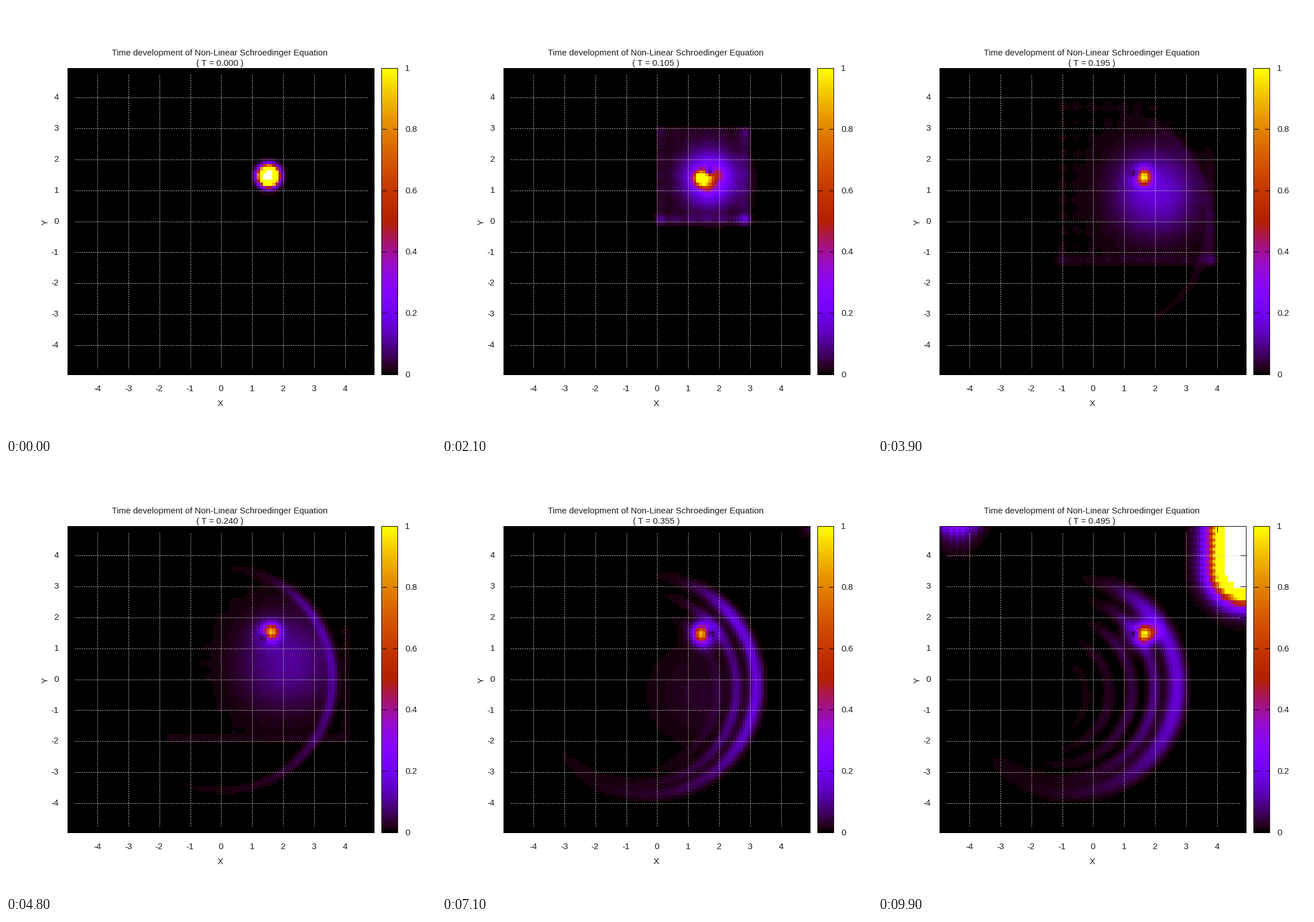
Write a matplotlib script that moves like this. It is 748 by 748 pixels and loops after 10000 ms.

```python
import numpy as np
import matplotlib.pyplot as plt
from matplotlib.animation import FuncAnimation
from matplotlib.colors import ListedColormap

SIZE, DPI, FRAMES = 748, 88, 100
PX = 72 / DPI
LO, HI = 108, 641          # plot square, same in x and y
MID, UNIT = 374.5, 533 / 9.9
END = .495                 # time of the last step
WHITE_ABOVE = 3.35

plt.rcParams["font.family"] = "Liberation Sans"

axis = np.linspace(-4.9, 4.9, 99)
X, Y = np.meshgrid(axis, axis)
RADIUS = np.hypot(X, Y)
PARITY = np.where(np.arange(99) % 2, 1.0, -1.0)


def palette(n):
    g = np.linspace(0, 1, n)
    blue = np.clip(np.sin(2 * np.pi * g), 0, 1)
    return np.column_stack([np.sqrt(g), g ** 3, blue])


def ramp(t, start, length):
    return np.clip((t - start) / length, 0, 1)


def step(v):
    return 1 / (1 + np.exp(-np.clip(v, -50, 50)))


def bell(v, w):
    return np.exp(-(v / w) ** 2)


def blob(x, y, w):
    return bell(np.hypot(X - x, Y - y), w)


def ring(t, n):
    """n-th wave crest reflected by the trap, counted inwards."""
    late = t - .24
    dx = X + 3 * late + .18 * n
    dy = Y + .2 * ramp(t, .24, .1) + .08 * n
    r = 3.6 - .5 * late - n * (.37 + .7 * late)
    w = .15 + .5 * max(late, 0) / (1 + 2 * n)
    phi = np.degrees(np.arctan2(dy, dx))
    turn = (phi + 80 + 180) % 360 - 180
    around = bell(phi + 5 + 4 * n, 50) + .6 * bell(phi - 40, 20) + .12 * bell(turn, 58)
    amp = .16 * .55 ** n * ramp(t, .18 + .06 * n, .12)
    return amp * around * bell(np.hypot(dx, dy) - r, w)


def front(v, lo, hi, low_peak, high_peak):
    ripple = .6 + .12 * np.cos(2 * np.pi * (v - lo - .15) / .5)
    peaks = low_peak * bell(v - lo - .2, .17) + high_peak * bell(v - hi + .2, .17)
    return step((v - lo) / .04) * step((hi - v) / .04) * (ripple + peaks)


def wavefront(t):
    """Square lattice front that runs ahead of the cloud."""
    amp = .11 * np.exp(-10 * t) * ramp(t, 0, .03)
    hi_x = 1.5 + 2.9 * np.sin(min(5.3 * t, np.pi / 2))
    hi_y = 1.5 + 2.6 * np.sin(min(6 * t, np.pi / 2))
    weak = max(.75 - 2.6 * t, 0)
    fx = front(X, 1.25 - 12.5 * t, hi_x, weak, 1.5)
    fy = front(Y, 1.4 - 14.6 * t, hi_y, 1.5, weak)
    return amp * fx * fy * step((4.45 - RADIUS) / .08)


def cloud(t):
    """Dispersed part, swinging clockwise towards the trap centre."""
    amp = .42 * ramp(t, 0, .03) * np.exp(-(t / .2) ** 1.8)
    r = 2.2 - 7 * max(t - .24, 0)
    a = np.radians(45 - 520 * t * t)
    spread = min(.3 + 4.9 * t, 1.45)
    return (amp * blob(r * np.cos(a), r * np.sin(a), spread)
            * step((3.75 - RADIUS) / .08))


def core(t):
    """Bright peak on a small orbit, its glow and the hole opposite it."""
    m = ramp(t, 0, .1)
    a = np.radians(225 + 1270 * (t - .105))
    bx, by = 1.53, 1.47
    ox, oy = m * np.cos(a), m * np.sin(a)
    kx = 17 + 6 * m * np.cos(2 * a)
    ky = 17 + m * (4 - 4 * np.cos(2 * a))
    amp = .7 + 4.4 * np.exp(-t / .055)
    peak = amp * np.exp(-kx * (X - bx - .11 * ox) ** 2 - ky * (Y - by - .11 * oy) ** 2)

    arm = .28 * bell(t - .125, .04) + .3 * ramp(t, .44, .055)
    glow = (.2 * ramp(t, .1, .25) * blob(bx, by, .42)
            + arm * blob(1.9, 1.5, .24)
            + .2 * bell(t - .1, .03) * blob(1.65, 1.12, .24))
    hole = 1 - .85 * m * blob(bx - .22 * ox, by - .22 * oy, .13)
    return peak + glow, hole


def corners(t):
    """Growing noise at the upper edges."""
    left = t - END
    u, v = 4.95 - X, 4.95 - Y
    reach = max(1.35 + 9 * left, 0)
    d = np.hypot(u, np.maximum(v - reach, 0)) - 1 - 12 * left
    right = np.exp(-3.4 * d - 1.3 * d * np.abs(d)) * (1 + .1 * PARITY[:, None])
    top = (.35 * np.exp(36 * left - 3.5 * v) * bell(X + 4.4, .6)
           * (1 + .15 * PARITY[None, :]))
    return right + top


def density(t):
    peak, hole = core(t)
    total = peak + cloud(t) + wavefront(t) + sum(ring(t, n) for n in range(5))
    total = total * hole + corners(t)
    return np.where(total > WHITE_ABOVE, np.nan, total)


fig = plt.figure(figsize=(SIZE / DPI, SIZE / DPI), dpi=DPI, facecolor="white")
ax = fig.add_axes([0, 0, 1, 1])
ax.axis("off")

cmap = ListedColormap(palette(128))
cmap.set_bad("white")


def show(data, x1, x2):
    return ax.imshow(data, cmap=cmap, vmin=0, vmax=1, origin="lower",
                     extent=(x1, x2, HI, LO), aspect="auto",
                     interpolation="nearest", zorder=1)


image = show(density(0), LO, HI)
show(np.linspace(0, 1, 128)[:, None], 654, 681)
ax.set_xlim(0, SIZE)
ax.set_ylim(SIZE, 0)


def line(xs, ys, color="black", **kw):
    ax.plot(xs, ys, color=color, lw=PX, solid_capstyle="butt",
            dash_capstyle="butt", zorder=3, **kw)


def box(x1, x2):
    y1, y2 = LO - .5, HI - .5
    line([x1, x2, x2, x1, x1], [y1, y1, y2, y2, y1])


def label(x, y, s, ha="center", va="baseline", **kw):
    return ax.text(x, y, s, ha=ha, va=va, fontsize=15 * PX, color="#1c1c1c", **kw)


TICK = 11
DOTS = dict(color="#c8c8c8", linestyle=(0, (2, 2)))
for k in range(-4, 5):
    gx, gy = MID + UNIT * k, MID - UNIT * k
    line([gx, gx], [HI - TICK, LO + TICK], **DOTS)
    line([LO + TICK, HI - TICK], [gy, gy], **DOTS)
    for edge in (LO, HI - TICK):
        line([edge, edge + TICK], [gy, gy])
        line([gx, gx], [edge, edge + TICK])
    label(gx - .5, 670.5, str(k))
    label(92, gy + 4.3, str(k), "right")

box(LO - .5, HI - .5)
box(653.5, 681.5)
for i in range(6):
    y = HI - .5 - (HI - LO) * i / 5
    if 0 < i < 5:
        line([654, 662], [y, y])
        line([673, 681], [y, y])
    label(694, y + 5, f"{i / 5:g}", "left")

label(372, 86, "Time development of Non-Linear Schroedinger Equation")
label(372.5, 696, "X")
label(69, 376, "Y", va="center", rotation=90)
clock = label(372.5, 104, "")


def update(i):
    t = .005 * i
    image.set_data(density(t))
    clock.set_text(f"( T = {t:.3f} )")
    return image, clock


anim = FuncAnimation(fig, update, frames=FRAMES, interval=100,
                     repeat=True, repeat_delay=0, blit=False)
plt.show()
```
